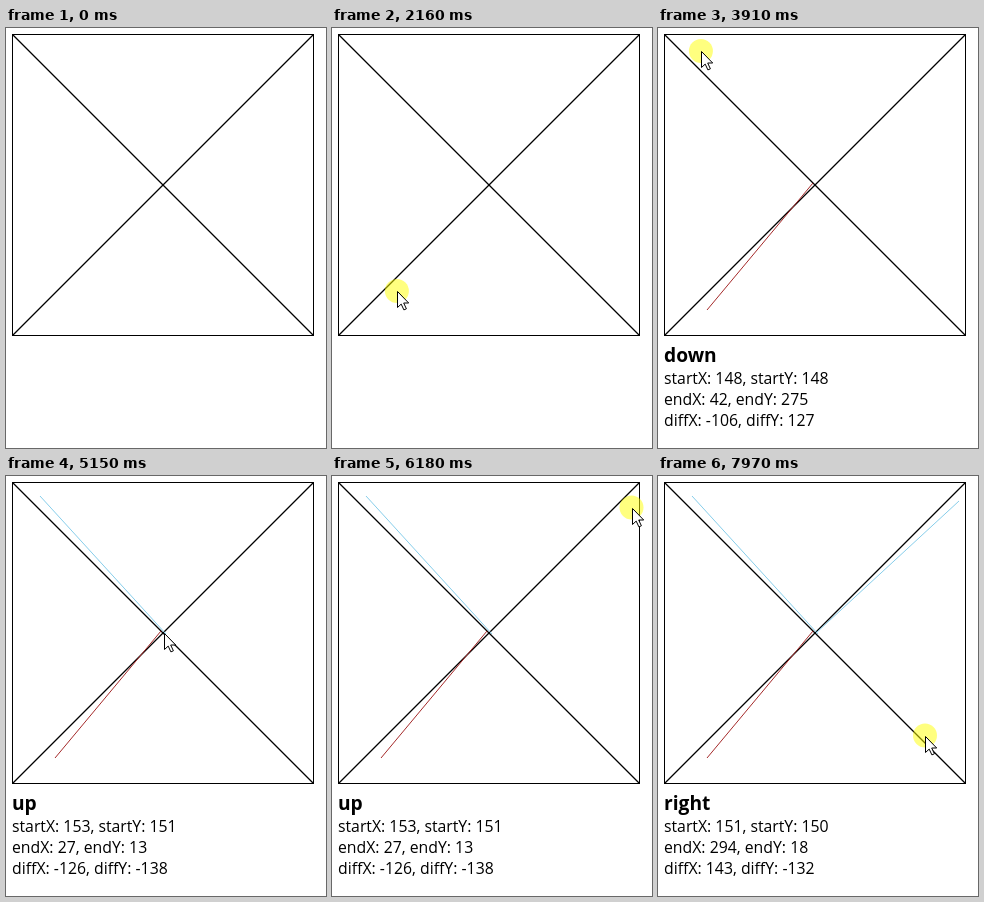
Recreate the animation shown at these times as an HTML page with a canvas. Size 320 by 420 pixels, loop 8000 ms.

```html
<!DOCTYPE html>
<html lang="en">
<head>
<meta charset="utf-8">
<title>Swipe direction</title>
<style>
  html, body { margin: 0; width: 100%; height: 100%; overflow: hidden; background: #fff; }
  canvas { display: block; }
</style>
</head>
<body>
<canvas id="stage" width="320" height="420"></canvas>
<script>
const ctx = document.getElementById('stage').getContext('2d');
const LOOP = 8000;
const ORIGIN = 7;
const SIZE = 300;
const FONT = '"Open Sans", "Noto Sans", sans-serif';

const ease = {
  lin: p => p,
  io: p => p * p * (3 - 2 * p),
  out: p => 1 - (1 - p) * (1 - p)
};

// Pointer path: time, x, y, easing used to get there
const path = [
  [390, 250, 383],
  [1150, 158, 158, 'out'],
  [1280, 158, 158],
  [1410, 156, 156.5],
  [1510, 155, 155],
  [1700, 155, 155],
  [2310, 49, 282, 'io'],
  [2700, 49, 282],
  [3050, 174, 133, 'io'],
  [3230, 157, 157, 'io'],
  [3300, 157, 157],
  [3400, 160, 158],
  [3500, 160, 158],
  [3530, 153, 145],
  [3910, 43, 23, 'out'],
  [4000, 35, 21],
  [4170, 35, 21],
  [4200, 34, 20],
  [4500, 34, 20],
  [5000, 165, 160, 'io'],
  [5150, 158, 157, 'io'],
  [5280, 158, 157],
  [6050, 298, 36, 'io'],
  [6120, 298, 36],
  [6180, 299.5, 31.5],
  [6350, 299.5, 31.5],
  [6410, 301, 25],
  [6680, 301, 25],
  [7400, 158, 155, 'io'],
  [7480, 158, 155],
  [7970, 267, 259.5, 'io']
];

const swipes = [
  { down: 1510, up: 2510, from: [148, 148], to: [42, 275], name: 'down', color: '#a52a2a' },
  { down: 3450, up: 4400, from: [153, 151], to: [27, 13], name: 'up', color: '#87ceeb' },
  { down: 5310, up: 6630, from: [151, 150], to: [294, 18], name: 'right', color: '#87ceeb' },
  { down: 7490, up: LOOP }
];

function pointerAt(t) {
  if (t < path[0][0]) return null;
  const i = path.findIndex(k => k[0] > t);
  if (i < 0) return path[path.length - 1].slice(1, 3);
  const a = path[i - 1], b = path[i];
  const p = ease[b[3] || 'lin']((t - a[0]) / (b[0] - a[0]));
  return [a[1] + (b[1] - a[1]) * p, a[2] + (b[2] - a[2]) * p];
}

function line(x1, y1, x2, y2, color, width = 1) {
  ctx.strokeStyle = color;
  ctx.lineWidth = width;
  ctx.beginPath();
  ctx.moveTo(ORIGIN + x1, ORIGIN + y1);
  ctx.lineTo(ORIGIN + x2, ORIGIN + y2);
  ctx.stroke();
}

function drawBoard() {
  ctx.fillStyle = '#fff';
  ctx.fillRect(0, 0, 320, 420);
  line(0, 0, SIZE, SIZE, '#000', 1.2);
  line(SIZE, 0, 0, SIZE, '#000', 1.2);
  ctx.lineWidth = 1;
  ctx.strokeRect(ORIGIN - 0.5, ORIGIN - 0.5, SIZE + 1, SIZE + 1);
}

function drawInfo({ name, from, to }) {
  ctx.fillStyle = '#000';
  ctx.font = `bold 19.2px ${FONT}`;
  ctx.fillText(name, 6, 334);
  ctx.font = `15.8px ${FONT}`;
  const row = (key, [x, y], base) => ctx.fillText(`${key}X: ${x}, ${key}Y: ${y}`, 6, base);
  row('start', from, 356);
  row('end', to, 377);
  row('diff', [to[0] - from[0], to[1] - from[1]], 398);
}

const arrow = new Path2D('M0 0V16L3.7 12.6L6.4 18.4L8.9 17.3L6.2 11.5H11.2Z');

function drawPointer([x, y], pressed) {
  if (pressed) {
    ctx.fillStyle = 'rgba(255, 255, 0, 0.5)';
    ctx.beginPath();
    ctx.arc(x, y, 12, 0, Math.PI * 2);
    ctx.fill();
  }
  ctx.save();
  ctx.translate(Math.round(x) + 0.5, Math.round(y) + 0.5);
  ctx.fillStyle = '#fff';
  ctx.strokeStyle = '#000';
  ctx.lineWidth = 1;
  ctx.fill(arrow);
  ctx.stroke(arrow);
  ctx.restore();
}

function draw(t) {
  drawBoard();
  const done = swipes.filter(s => t >= s.up);
  done.forEach(s => line(...s.from, ...s.to, s.color));
  if (done.length) drawInfo(done[done.length - 1]);
  const pos = pointerAt(t);
  if (pos) drawPointer(pos, swipes.some(s => t >= s.down && t < s.up));
}

const start = performance.now();
function tick() {
  draw((performance.now() - start) % LOOP);
  requestAnimationFrame(tick);
}
tick();
</script>
</body>
</html>
```
